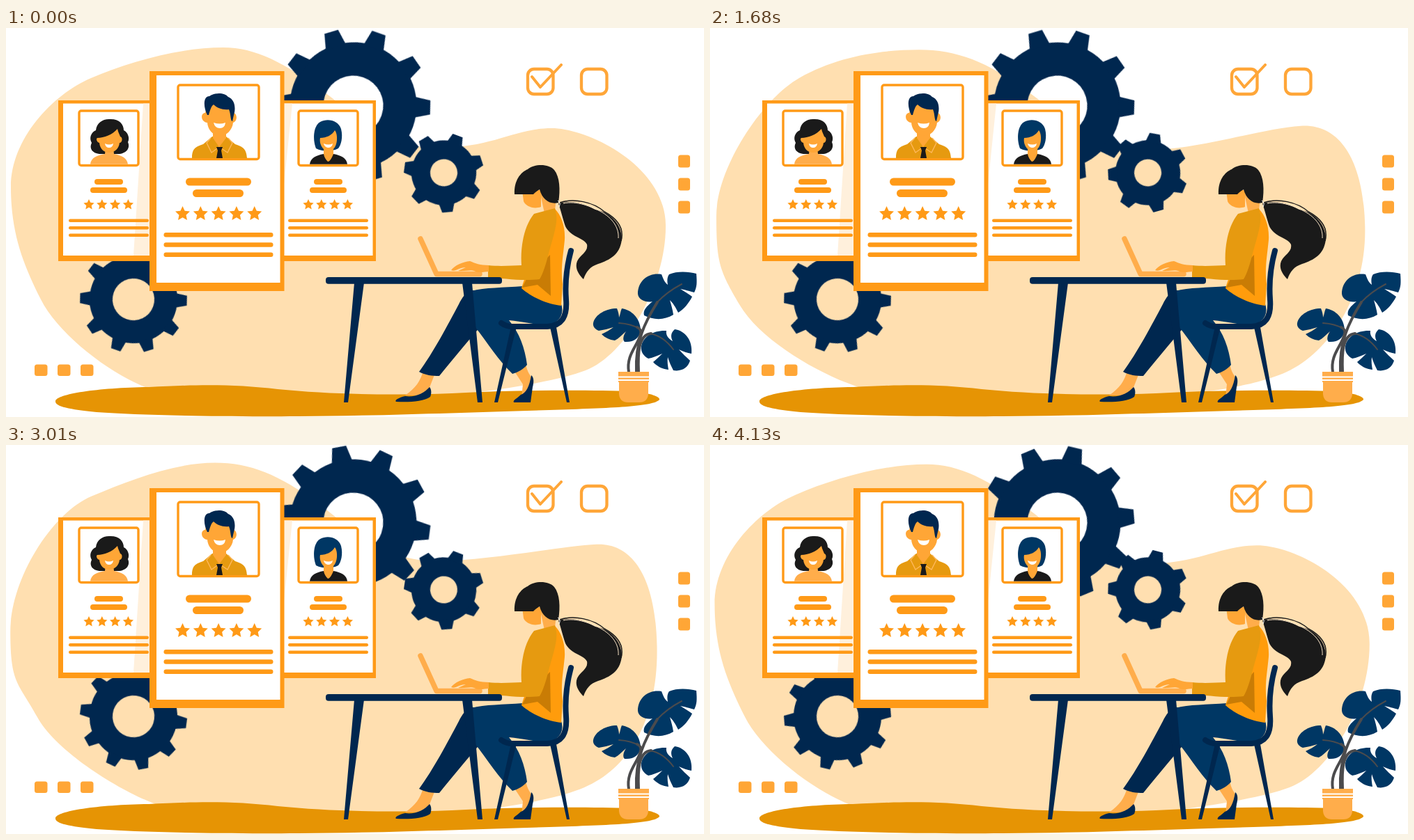
Write an HTML page that moves like this. It is 1002 px wide and 559 px high and loops after 4200 ms.

```html
<!DOCTYPE html>
<html lang="en">
<head>
<meta charset="utf-8">
<title>Reviewing candidates</title>
<style>
html, body { margin: 0; width: 100%; height: 100%; overflow: hidden; background: #fff; }
svg { display: block; width: 100%; height: 100%; }
.navy { fill: #00274f; } .denim { fill: #003764; } .black { fill: #1a1a1a; }
.orange { fill: #ff9a17; } .soft { fill: #ffa636; } .skin { fill: #ffad4b; }
.amber { fill: #e69404; } .mustard { fill: #e69a10; } .white { fill: #fff; }
.line { fill: none; stroke: #ff9a17; stroke-width: 3.4; }
.box { fill: none; stroke: #ffa638; stroke-width: 4.3; stroke-linecap: round; stroke-linejoin: round; }
.stem { fill: none; stroke: #4b4b4d; stroke-width: 4; stroke-linecap: round; }

#blob { fill: #ffdfb0; animation: wobble 2100ms linear infinite alternate; }
@keyframes wobble {
  0% { d: path("M312 28C358 28 400 50 458 93S540 172 620 172S730 144 783 144S946 198 947 283S890 470 832 492S620 535 500 535S260 538 205 518S75 440 50 390S7 296 7 228S66 96 122 72S250 28 312 28Z"); }
  27% { d: path("M305 26C355 26 400 47 458 93S540 167 620 167S748 148 800 147S943 190 945 295S895 470 832 492S620 535 500 535S250 538 197 517S72 440 48 390S4 298 4 230S66 96 122 71S245 26 305 26Z"); }
  54% { d: path("M300 25C350 25 392 42 448 84S545 167 620 166S800 145 848 143S932 185 934 290S895 465 830 492S620 535 500 535S275 538 220 518S72 440 45 390S6 345 6 268S66 97 122 74S242 25 300 25Z"); animation-timing-function: cubic-bezier(.3, .3, .5, 1); }
  100% { d: path("M300 33C355 33 400 50 458 93S560 178 630 178S790 144 848 140S940 190 942 285S890 465 827 495S620 535 500 535S270 535 210 515S72 450 42 400S10 335 10 270S76 104 130 71S245 33 300 33Z"); }
}
/* the small lead keeps each step clear of its boundary */
.gear { animation: spin 4200ms steps(60) -5ms infinite; }
@keyframes spin {
  from { transform: rotate(var(--phase)); }
  to { transform: rotate(calc(var(--phase) + 360deg)); }
}
</style>
</head>
<body>
<svg viewBox="0 0 1002 559">
  <defs>
    <path id="star" class="orange"/>
    <g id="details">
      <rect class="line" x="105" y="119" width="85" height="78.5" rx="3"/>
      <g class="orange">
        <rect x="127" y="217" width="41" height="8" rx="4"/>
        <rect x="121" y="229" width="53" height="8" rx="4"/>
        <rect x="90" y="274.5" width="115" height="4.6" rx="2.3"/>
        <rect x="90" y="285" width="115" height="4.6" rx="2.3"/>
        <rect x="90" y="295.5" width="115" height="4.6" rx="2.3"/>
      </g>
      <g class="stars" data-row="119 254 18.8 4 .73"></g>
    </g>
  </defs>

  <path id="blob" d="M312 28C358 28 400 50 458 93S540 172 620 172S730 144 783 144S946 198 947 283S890 470 832 492S620 535 500 535S260 538 205 518S75 440 50 390S7 296 7 228S66 96 122 72S250 28 312 28Z"/>
  <path class="amber" d="M71 536C73 526 130 517 205 516C280 512 330 512 390 519C470 527 560 528 640 525C730 520 830 520 900 522C927 525 939 530 938 534C930 544 870 546 780 549C660 552 560 557 420 558C290 559 190 556 130 552C90 548 70 544 71 536Z"/>

  <g id="gears" class="navy"></g>

  <!-- side cards -->
  <path class="orange" d="M75 104H210V335H75ZM395 104H531V335H395Z"/>
  <path class="white" d="M82 108.500H206V327H82ZM399 108.500H526.500V327H399Z"/>
  <path fill="#fff0dc" d="M197 108.500H207V327H183ZM399 108.500H411L399 225Z"/>
  <use href="#details"/>
  <use href="#details" x="315"/>

  <!-- left portrait -->
  <path class="black" d="M148 131C162 130 169 138 169 147C175 150 178 158 175 164C179 173 172 181 161 181H134C124 180 119 173 123 165C119 158 122 150 129 147C130 137 138 131 148 131Z"/>
  <path class="skin" d="M121 195.800C122 186 131 183 142 181L143 172H154L155 181C166 183 174 187 175 195.800Z"/>
  <path class="soft" d="M131 158C141 158 153 153 160 145C161 150 163 153 164 156C168 157 167 165 163 165C162 174 155 179 148 179C141 179 135 174 134 165C130 164 129 159 131 158Z"/>
  <path class="white" d="M142 166Q148 169 154 166Q153 172 148 172Q143 172 142 166Z"/>

  <!-- right portrait -->
  <path class="denim" d="M445 173C440 160 441 141 451 135C462 129 477 133 481 145C484 157 481 168 477 173C467 178 455 178 445 173Z"/>
  <path class="black" d="M436 195.800C437 187 445 183 456 181H470C481 183 489 187 490 195.800Z"/>
  <path class="soft" d="M451 158C460 158 468 154 472 147C476 151 477 167 470 174L470 181C467 189 464 192 462 192C459 189 457 186 456 181V174C451 169 450 162 451 158Z"/>
  <path class="white" d="M456 166Q463 169 469 166Q468 172 462 172Q457 171 456 166Z"/>

  <!-- main card -->
  <path class="orange" d="M206 62H399.500V378H206Z"/>
  <path class="white" d="M216 68H393.500V366H216Z"/>
  <rect class="line" x="247" y="82" width="116" height="106.500" rx="3"/>
  <g class="orange">
    <rect x="258" y="215.500" width="94" height="11" rx="5.500"/>
    <rect x="268" y="232" width="73" height="11" rx="5.500"/>
    <rect x="226.500" y="294" width="157" height="6.400" rx="3.200"/>
    <rect x="226.500" y="308.300" width="157" height="6.400" rx="3.200"/>
    <rect x="226.500" y="322.600" width="157" height="6.400" rx="3.200"/>
  </g>
  <g class="stars" data-row="253.500 267 25.800 5 1"></g>

  <!-- main portrait -->
  <path class="mustard" d="M267 187C267 174 271 171 283 167L296 156H316L329 167C341 171 345 174 346 187Z"/>
  <path class="soft" d="M297 148H316V158L306 171L297 158Z"/>
  <path class="soft" d="M289 108H326V122C332 122 333 134 326 136C325 147 316 155 307 155C298 155 290 147 289 136C279 135 279 122 286 122Z"/>
  <path class="navy" d="M289 125C283 113 283 98 292 98C301 92 314 93 319 99C329 103 330 116 327 125L325 134C322 134 323 124 320 117C311 118 303 115 298 110C294 113 293 119 291 125Z"/>
  <path class="white" d="M298 136Q307 139 315 136Q314 144 307 144Q300 144 298 136Z"/>
  <path fill="none" stroke="#ffb95e" stroke-width="1.300" d="M294 158L288 165L295 179L306 171L318 179L325 165L319 158"/>
  <path class="black" d="M302 171H311L309 176L311 187H302L304 176Z"/>

  <!-- checkboxes and squares -->
  <g class="box">
    <rect x="749" y="59" width="36.500" height="36" rx="9"/>
    <rect x="826" y="59" width="36.500" height="36" rx="9"/>
    <path stroke-width="4" d="M755 70L767 85L797 53"/>
  </g>
  <g id="squares" class="soft"></g>

  <!-- far leg -->
  <path class="skin" d="M599 492L616 496L607 519L592 528H573C588 517 595 508 599 492Z"/>
  <path class="navy" d="M608 516C611 519 611 526 609 530C599 537 578 538 560 537C557 535 564 531 573 529C587 531 600 525 608 516Z"/>
  <path class="navy" d="M670 377C660 379 655 387 650 397C634 427 613 467 593 494C602 499 612 500 622 500C644 473 668 444 688 421L710 380Z"/>

  <!-- near leg -->
  <path class="skin" d="M729 492L746 482C748 495 753 499 756 505L751 522L740 531L742 512Z"/>
  <path class="navy" d="M754 499C758 502 758 509 756 516L753 538H729C727 535 734 532 739 527C747 524 751 516 754 499Z"/>
  <path class="denim" d="M742 371C714 373 687 373 668 378C656 386 661 413 673 429C691 452 708 479 727 497C735 495 743 490 748 484C745 460 737 438 722 420C745 422 762 428 781 426C797 422 801 408 797 397Z"/>

  <!-- torso -->
  <path class="skin" d="M767 238L791 235L788 262L774 270L771 257Z"/>
  <path class="soft" d="M741 233H768V257C757 261 746 256 743 249Z"/>
  <path fill="#ff9c0c" d="M759 268L788 260C797 269 803 285 802 304C800 327 796 344 799 368L797 399C777 397 753 386 740 374C744 360 748 352 751 345Z"/>
  <path fill="#c97c05" d="M781 326L782 385L763 369L741 373L748 359Z"/>
  <path class="mustard" d="M758 267L788 259L790 268C792 282 785 302 780 320C775 340 771 353 766 361C742 364 714 360 692 358V341C712 343 728 341 740 341C738 314 744 284 758 267Z"/>

  <!-- hair -->
  <path class="black" d="M730 239C729 219 739 207 749 203C759 195 779 195 787 204C795 214 796 232 793 251C781 254 770 247 766 232C762 234 759 237 757 239Z"/>
  <path class="black" d="M793 252C812 247 830 252 846 261C866 264 884 281 884 303C882 325 868 333 850 339C838 343 833 350 829 361C822 354 816 345 820 335C825 325 836 322 834 311C829 301 811 301 803 285C799 273 797 264 793 252Z"/>
  <path fill="none" stroke="#1a1a1a" stroke-width="1.500" d="M795 251C815 244 843 250 859 264C881 276 887 291 883 306"/>
  <path fill="none" stroke="#ffe9cb" stroke-width="1" d="M800 252C819 248 840 256 856 265C874 276 880 290 879 302"/>
  <path fill="none" stroke="#fff" stroke-width="1" d="M792 248Q797 251 794 257"/>

  <!-- chair, table -->
  <path class="navy" d="M725 429H733L706 538H701ZM781 430H790L809 538H805Z"/>
  <path fill="none" stroke="#00274f" stroke-width="8" stroke-linecap="round" d="M811 320C805 342 802 362 804 390C806 416 797 428 777 429H727Q718 429 711 424"/>
  <path class="navy" d="M500 366H514L491 538H485ZM655 366H669L684 538H677Z"/>
  <rect class="navy" x="459" y="358" width="253" height="9.800" rx="4"/>

  <!-- laptop and hand -->
  <path fill="none" stroke="#ffad4b" stroke-width="7.500" stroke-linecap="round" stroke-linejoin="round" d="M595 303L618 353.500H680"/>
  <path class="soft" d="M693 341C681 341 673 338 666 335C656 336 644 341 639 348C645 351 650 344 660 344L649 349C659 350 667 347 672 349C679 353 687 350 693 350Z"/>

  <!-- plant -->
  <g class="denim">
    <path d="M907 382C907 362 924 351 941 354C944 362 946 366 950 369C949 363 949 358 952 354C963 349 980 350 991 353C992 366 992 372 988 380C980 378 975 376 968 375C974 379 980 382 985 386C980 396 973 404 965 409C961 401 958 396 953 391C955 398 957 405 958 412C945 420 930 420 916 413C914 405 920 400 928 393C919 395 908 391 907 382Z"/>
    <path d="M843 424C846 411 862 403 877 403C879 408 880 412 880 416C882 411 882 407 884 403C898 405 910 417 911 433C910 446 901 452 888 451C885 448 886 442 890 436C884 441 880 446 874 449C866 448 860 445 855 440C861 437 867 434 872 430C865 432 858 434 851 435C846 433 842 429 843 424Z"/>
    <path d="M912 458C914 443 930 434 948 435C947 441 950 446 957 450C954 444 954 438 960 433C975 435 986 449 984 468C978 467 972 465 966 462C971 468 977 473 982 478C979 488 970 494 958 492C955 486 952 480 950 473C949 479 950 485 951 491C942 490 934 486 929 480C934 476 938 472 942 468C935 471 928 474 922 475C915 471 911 465 912 458Z"/>
  </g>
  <g class="stem">
    <path d="M905 494C903 451 917 423 935 394"/>
    <path stroke-width="2" d="M935 394Q949 379 970 368M880 424Q897 425 909 432M925 439Q944 443 958 462"/>
    <path d="M894 494C890 470 906 458 911 440Q913 433 906 430"/>
    <path d="M908 494C907 470 907 441 926 439"/>
  </g>
  <path class="skin" d="M879 494H923V509H922V526Q921 538 909 538H893Q881 538 880 526V509H879Z"/>
  <path class="white" d="M879 500.500H923V502.500H879ZM879 505H923V507H879Z"/>
</svg>
<script>
const $ = selector => document.querySelector(selector);
const polar = (radius, angle) => [radius * Math.sin(angle), -radius * Math.cos(angle)].map(v => v.toFixed(2)).join(" ");

function gear(x, y, hole, body, outer, teeth, top, base, phase) {
  const points = [];
  for (let i = 0; i < teeth; i++) {
    const middle = 2 * Math.PI * i / teeth;
    const at = (radius, half) => polar(radius, middle + Math.asin(half / radius));
    points.push(`M${at(body - 2, -base)}L${at(outer, -top)}L${at(outer, top)}L${at(body - 2, base)}Z`);
  }
  return `<g transform="translate(${x} ${y})"><g class="gear" style="--phase:${phase}deg">
    <circle r="${(hole + body) / 2}" fill="none" stroke="#00274f" stroke-width="${body - hole}"/>
    <path d="${points.join("")}"/></g></g>`;
}

$("#gears").innerHTML =
  gear(498.5, 111.5, 43, 91, 111, 10, 10.2, 15, 19.4) +
  gear(183, 390, 30, 63, 77, 10, 7.1, 10.4, 19.4) +
  gear(628.5, 208, 19.5, 46.5, 57.5, 7, 7.5, 11.5, 20.5);

const tips = Array.from({ length: 10 }, (_, i) => polar(i % 2 ? 5.3 : 11, Math.PI * i / 5));
$("#star").setAttribute("d", `M${tips.join("L")}Z`);
for (const row of document.querySelectorAll(".stars")) {
  const [x, y, gap, count, size] = row.dataset.row.split(" ").map(Number);
  for (let i = 0; i < count; i++)
    row.innerHTML += `<use href="#star" transform="translate(${x + i * gap} ${y}) scale(${size})"/>`;
}

for (let i = 0; i < 3; i++)
  $("#squares").innerHTML +=
    `<rect x="${41 + 33 * i}" y="483.500" width="18.500" height="16.500" rx="3.500"/>` +
    `<rect x="965" y="${182.5 + 33 * i}" width="17" height="18" rx="3.500"/>`;
</script>
</body>
</html>
```
